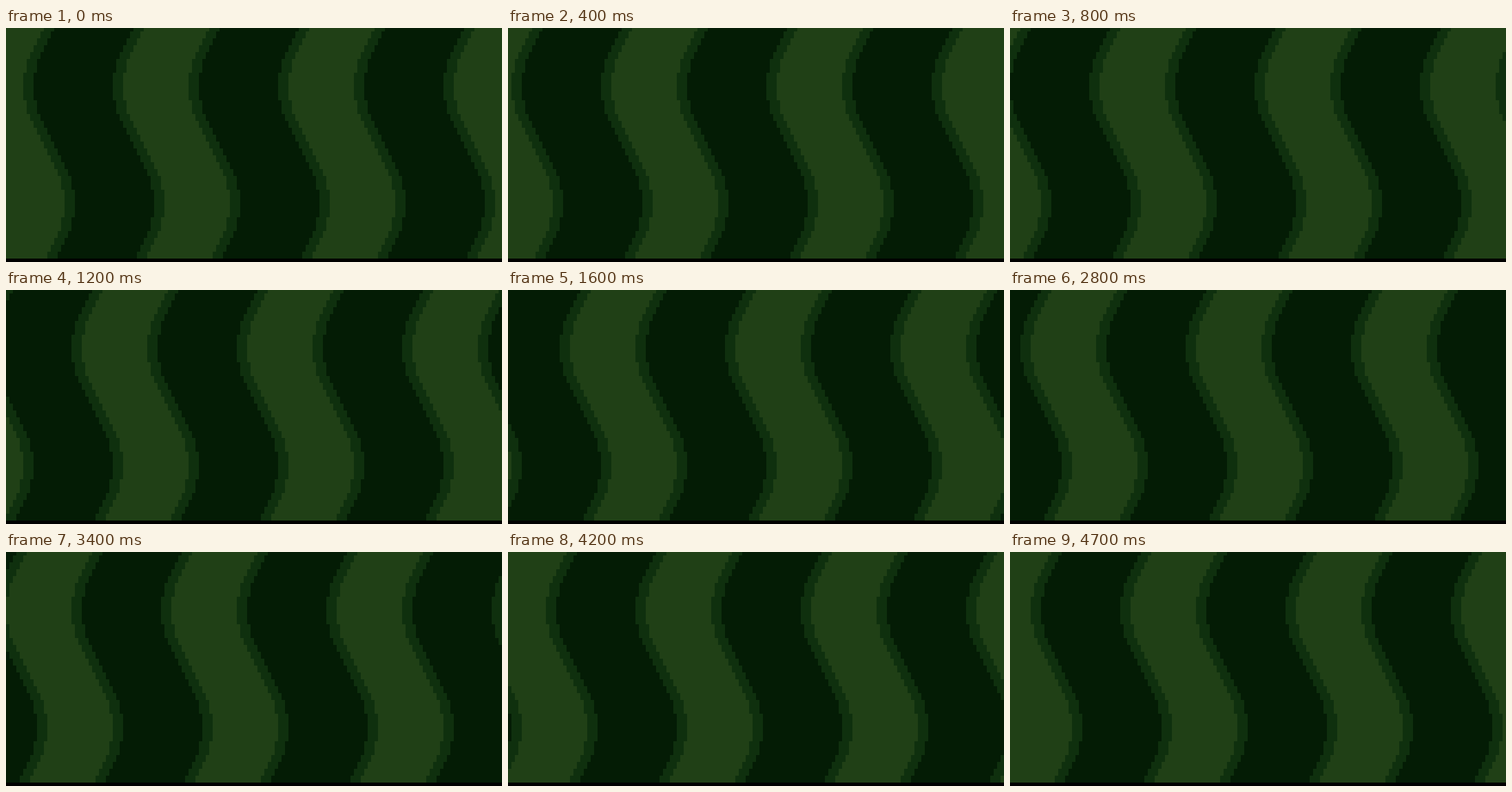
These frames come from a looping animation (720 by 340 pixels, 4800 ms). An HTML page with a canvas:

```html
<!DOCTYPE html>
<html lang="en">
<head>
<meta charset="utf-8">
<title>Green waves</title>
<style>
html, body { margin: 0; width: 100%; height: 100%; overflow: hidden; background: #000; }
canvas { display: block; }
</style>
</head>
<body>
<canvas id="stage" width="720" height="340"></canvas>
<script>
const ctx = document.getElementById('stage').getContext('2d');
const CELL = 5, COLS = 144, ROWS = 67, PERIOD = 48, STEP_MS = 100;
const LIGHT = '#204016', MID = '#0f300e', DARK = '#041c05';

// Bands within one period, in cells: start, width, colour
const BANDS = [[11, 3, MID], [14, 23, DARK], [37, 3, MID]];

function bend(row) {
  return Math.round(6 * Math.sin(2 * Math.PI * (row + 0.5) / 68));
}

function draw(step) {
  ctx.fillStyle = LIGHT;
  ctx.fillRect(0, 0, COLS * CELL, ROWS * CELL);
  for (let row = 0; row < ROWS; row++) {
    const shift = step + bend(row);
    for (const [start, width, color] of BANDS) {
      ctx.fillStyle = color;
      const first = ((start - shift) % PERIOD + PERIOD) % PERIOD - PERIOD;
      for (let x = first; x < COLS; x += PERIOD) {
        ctx.fillRect(x * CELL, row * CELL, width * CELL, CELL);
      }
    }
  }
  // Dark strip along the bottom
  ctx.fillStyle = '#000';
  ctx.fillRect(0, ROWS * CELL, COLS * CELL, CELL);
}

let last = -1;
function tick() {
  const step = Math.floor(performance.now() / STEP_MS) % PERIOD;
  if (step !== last) draw(last = step);
  requestAnimationFrame(tick);
}
tick();
</script>
</body>
</html>
```
